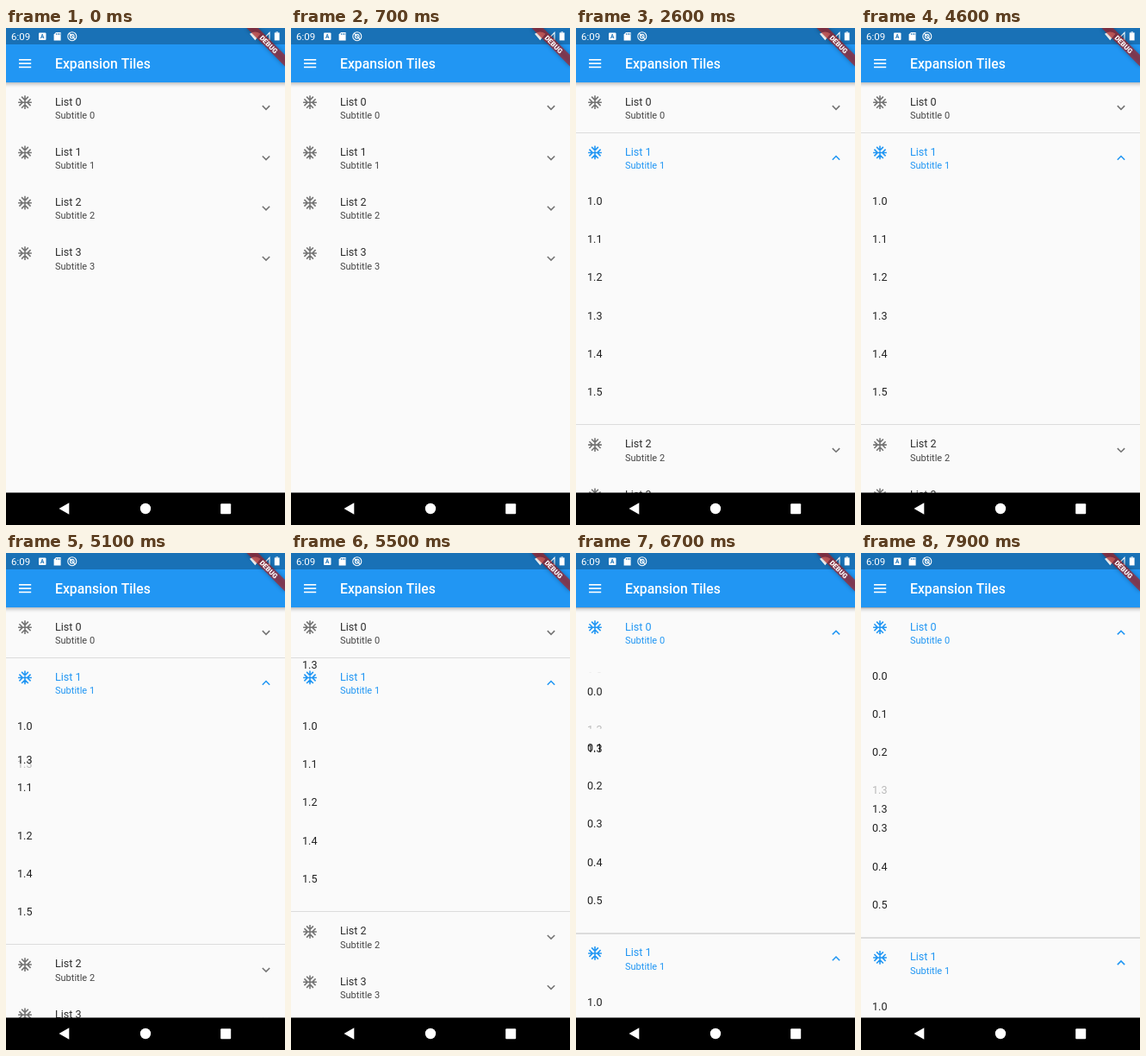
An HTML page with a canvas that plays this animation: 324 px wide and 576 px high, repeating every 8 s.

```html
<!DOCTYPE html>
<html lang="en">
<head>
<meta charset="utf-8">
<title>Expansion Tiles</title>
<style>
html, body { margin: 0; width: 100%; height: 100%; overflow: hidden; background: #fafafa; }
canvas { display: block; width: 324px; height: 576px; }
</style>
</head>
<body>
<canvas id="stage"></canvas>
<script>
const W = 324, H = 576, LOOP = 8000;
const DP = W / 411.43;
const HEADER = 74 * DP, ROW = 56 * DP, PAD = 20 * DP;
const TOP = 63, NAV = 538.5;
const FONT = 'Roboto, Arial, sans-serif';
const INK = [0, 0, 0, 0.82], SOFT = [0, 0, 0, 0.72], ICON = [0, 0, 0, 0.54], BLUE = [33, 150, 243, 1];

const PICKUP = 4700;
const OPEN_AT = [6100, 1950, Infinity, Infinity];
// Height of the carried row over time: [ms, y]
const PATH = [
  [4700, 333], [4820, 325], [5450, 134], [5500, 130], [5700, 100], [6000, 92], [6350, 95],
  [6500, 150], [6700, 226], [7000, 300], [7200, 318], [7350, 318], [7700, 297], [7850, 297], [7900, 296]
];
// Placeholder gaps: [list, slot, opens, closes]
const GAPS = [
  [1, 3, 4550, 4866], [1, 2, 4866, 5011], [1, 1, 5011, 5156], [1, 0, 5156, 5302],
  [0, 0, 6420, 6628], [0, 1, 6628, 6810], [0, 2, 6810, 6990], [0, 3, 6990, Infinity]
];

const canvas = document.getElementById('stage');
const ctx = canvas.getContext('2d');
const dpr = window.devicePixelRatio || 1;
canvas.width = W * dpr;
canvas.height = H * dpr;

const clamp = v => Math.max(0, Math.min(1, v));
const easeIn = p => Math.pow(p, 1.7);
const easeOut = p => 1 - Math.pow(1 - p, 1.7);
const mix = (a, b, p) => `rgba(${a.map((v, i) => v + (b[i] - v) * p).join()})`;
const css = c => mix(c, c, 0);

function along(path, t) {
  const i = path.findIndex(k => k[0] > t);
  if (i < 0) return path[path.length - 1][1];
  if (i === 0) return path[0][1];
  const [t0, y0] = path[i - 1], [t1, y1] = path[i];
  return y0 + (y1 - y0) * (t - t0) / (t1 - t0);
}

function text(s, x, y, size, color, weight = 400) {
  ctx.font = `${weight} ${size}px ${FONT}`;
  ctx.fillStyle = color;
  ctx.fillText(s, x, y);
}

function box(x, y, w, h, color) {
  ctx.fillStyle = color;
  ctx.fillRect(x, y, w, h);
}

function shape(points, color) {
  ctx.beginPath();
  points.forEach(([x, y]) => ctx.lineTo(x, y));
  ctx.closePath();
  ctx.fillStyle = color;
  ctx.fill();
}

function disc(x, y, r, color) {
  ctx.beginPath();
  ctx.arc(x, y, r, 0, Math.PI * 2);
  ctx.fillStyle = color;
  ctx.fill();
}

// Runs draw() in icon units around (x, y)
function icon(x, y, turn, color, draw) {
  ctx.save();
  ctx.translate(x, y);
  ctx.rotate(turn);
  ctx.scale(DP, DP);
  ctx.strokeStyle = color;
  ctx.lineWidth = 2;
  ctx.beginPath();
  draw();
  ctx.stroke();
  ctx.restore();
}

function snowflake(x, y, color) {
  icon(x, y, 0, color, () => {
    for (let i = 0; i < 4; i++) {
      ctx.moveTo(0, 0);
      ctx.lineTo(0, -10);
      ctx.moveTo(-4.95, -8.36);
      ctx.lineTo(0, -3.4);
      ctx.lineTo(4.95, -8.36);
      ctx.rotate(Math.PI / 2);
    }
  });
}

function chevron(x, y, turn, color) {
  icon(x, y, turn, color, () => {
    ctx.moveTo(-5.3, -2.7);
    ctx.lineTo(0, 2.6);
    ctx.lineTo(5.3, -2.7);
  });
}

const rowText = (s, top) => text(s, 13, top + ROW / 2 + 4.5, 16 * DP, css([0, 0, 0, 0.87]));

function gapSize(gap, t) {
  return ROW * (clamp((t - gap[2]) / 150) - clamp((t - gap[3]) / 122));
}

function bodyParts(list, t) {
  const carrying = t >= PICKUP;
  const rows = [0, 1, 2, 3, 4, 5].filter(n => !(list === 1 && n === 3 && carrying));
  const parts = [];
  rows.forEach((n, slot) => {
    if (carrying) {
      for (const gap of GAPS) {
        if (gap[0] === list && gap[1] === slot) parts.push({ ghost: true, h: gapSize(gap, t) });
      }
    }
    parts.push({ label: `${list}.${n}`, h: ROW });
  });
  return parts;
}

function drawBody(list, top, open, t) {
  const parts = bodyParts(list, t);
  const full = parts.reduce((sum, p) => sum + p.h, PAD);
  const shown = full * open;
  ctx.save();
  ctx.beginPath();
  ctx.rect(0, top, W, shown);
  ctx.clip();
  let y = top - (full - shown) / 2;
  for (const p of parts) {
    if (p.ghost && p.h > 0) {
      ctx.save();
      ctx.beginPath();
      ctx.rect(0, y, W, p.h);
      ctx.clip();
      ctx.globalAlpha = 0.3;
      rowText('1.3', y);
      ctx.restore();
    } else if (p.label) {
      rowText(p.label, y);
    }
    y += p.h;
  }
  ctx.restore();
  return shown;
}

function drawTile(list, top, t) {
  const p = clamp((t - OPEN_AT[list]) / 200);
  const open = easeIn(p);
  snowflake(22, top + 23.2, mix(ICON, BLUE, open));
  text(`List ${list}`, 57, top + 26.5, 16 * DP, mix(INK, BLUE, open));
  text(`Subtitle ${list}`, 57, top + 41.8, 14 * DP, mix(SOFT, BLUE, open));
  chevron(302, top + 29.3, Math.PI * open, mix(ICON, BLUE, open));
  let bottom = top + HEADER;
  if (p > 0) {
    bottom += drawBody(list, top + HEADER - 0.8, open, t);
    const line = `rgba(0,0,0,${0.12 * easeOut(p)})`;
    box(0, Math.round(top), W, 1, line);
    box(0, Math.round(bottom) - 1, W, 1, line);
  }
  return bottom;
}

function drawStatusBar() {
  box(0, 0, W, 19, '#1971b6');
  text('6:09', 6, 14, 11.5, '#fff');

  ctx.fillStyle = '#fff';
  ctx.beginPath();
  ctx.roundRect(38, 5.5, 8.5, 8.5, 1);
  ctx.fill();
  text('A', 40, 12.3, 6.5, '#1971b6', 700);

  shape([[58, 5], [63.6, 5], [63.6, 14.5], [55.6, 14.5], [55.6, 7.6]], '#fff');
  for (const x of [58.2, 60, 61.8]) box(x, 6, 0.8, 2, '#1971b6');

  ctx.strokeStyle = '#fff';
  ctx.lineWidth = 1.1;
  for (const r of [5, 2.3]) {
    ctx.beginPath();
    ctx.arc(76.8, 9.7, r, 0, Math.PI * 2);
    ctx.stroke();
  }
  ctx.beginPath();
  ctx.moveTo(73.3, 6.2);
  ctx.lineTo(80.3, 13.2);
  ctx.stroke();

  ctx.fillStyle = '#fff';
  ctx.beginPath();
  ctx.moveTo(289.3, 14.3);
  ctx.lineTo(283, 6.8);
  ctx.quadraticCurveTo(289.3, 2.4, 295.6, 6.8);
  ctx.fill();

  ctx.beginPath();
  ctx.moveTo(298, 13.6);
  ctx.lineTo(306, 13.6);
  ctx.lineTo(306, 5.4);
  ctx.closePath();
  ctx.stroke();

  box(311.8, 5.4, 5.8, 9, '#fff');
  box(313.4, 4.4, 2.6, 1, '#fff');
}

function drawAppBar() {
  ctx.save();
  ctx.shadowColor = 'rgba(0,0,0,0.32)';
  ctx.shadowBlur = 5 * dpr;
  ctx.shadowOffsetY = 1.5 * dpr;
  box(-10, 0, W + 20, TOP, '#2196f3');
  ctx.restore();
  drawStatusBar();
  for (const y of [-1, 0, 1]) box(15, 40.3 + y * 4.3, 14.2, 1.6, '#fff');
  text('Expansion Tiles', 57, 46.8, 20 * DP, '#fff', 500);
}

function drawBanner() {
  ctx.save();
  ctx.translate(W, 0);
  ctx.rotate(Math.PI / 4);
  ctx.shadowColor = 'rgba(0,0,0,0.5)';
  ctx.shadowBlur = 5 * dpr;
  box(-40 * DP, 28 * DP, 80 * DP, 12 * DP, 'rgba(183,28,28,0.63)');
  ctx.shadowColor = 'transparent';
  ctx.textAlign = 'center';
  text('DEBUG', 0, 34 * DP + 2.9, 10.2 * DP, '#fff', 900);
  ctx.restore();
}

function drawNavBar() {
  box(0, NAV, W, H - NAV, '#000');
  shape([[61.5, 557], [73.3, 550.2], [73.3, 563.8]], '#fff');
  disc(162, 557, 6.2, '#fff');
  ctx.fillStyle = '#fff';
  ctx.beginPath();
  ctx.roundRect(249.2, 551.2, 12, 12, 1);
  ctx.fill();
}

function draw(t) {
  ctx.setTransform(dpr, 0, 0, dpr, 0, 0);
  box(0, 0, W, H, '#fafafa');
  let y = TOP;
  for (let list = 0; list < 4; list++) y = drawTile(list, y, t);
  drawAppBar();
  if (t >= PICKUP) rowText('1.3', along(PATH, t) - ROW / 2);
  drawBanner();
  drawNavBar();
}

const start = performance.now();
function tick() {
  draw((performance.now() - start) % LOOP);
  requestAnimationFrame(tick);
}
tick();
</script>
</body>
</html>
```
